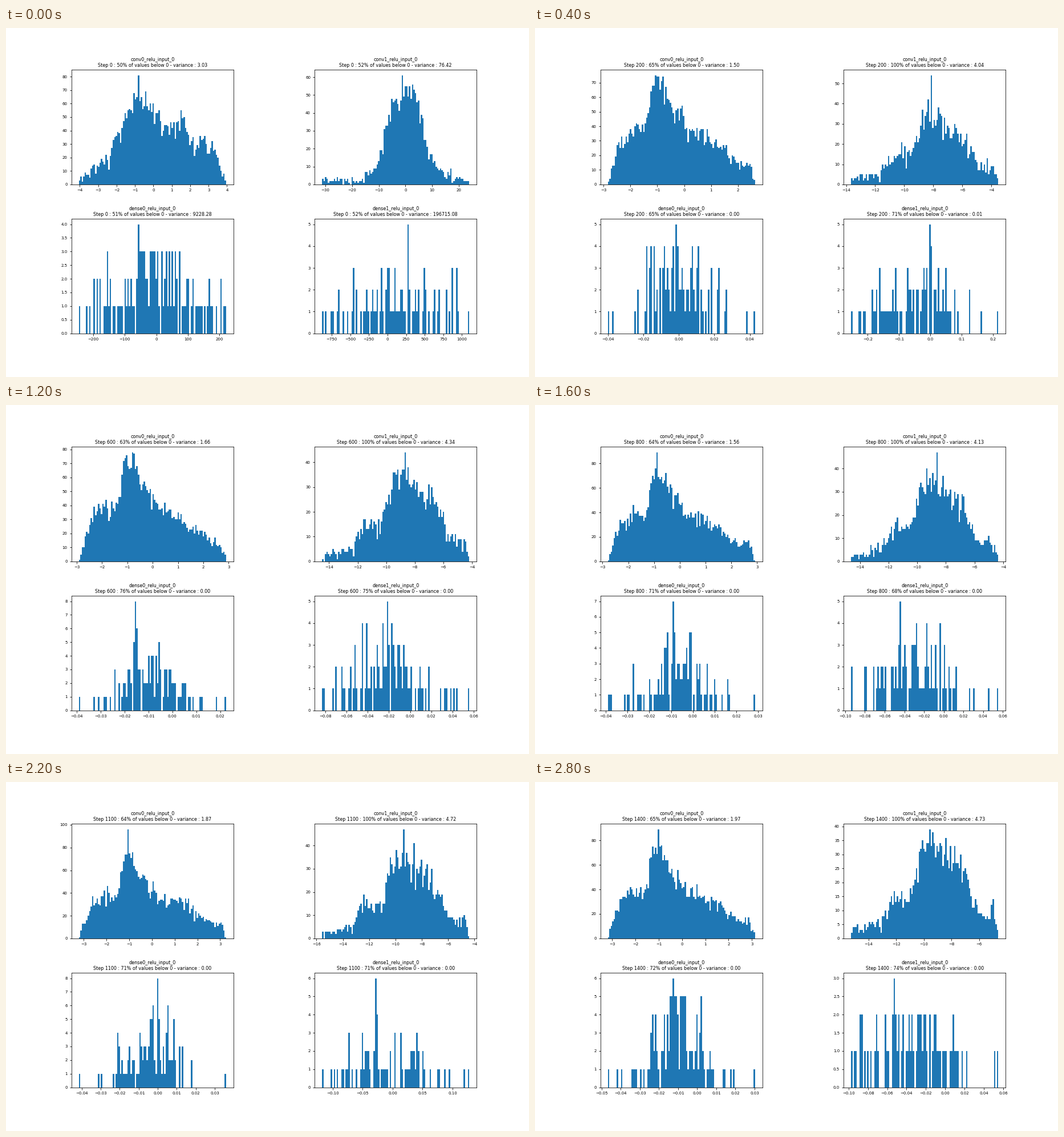
These frames come from a looping animation (917 by 611 pixels, 3 s). A matplotlib script:

```python
import numpy as np
import matplotlib.pyplot as plt
from matplotlib.animation import FuncAnimation

W, H, DPI = 917, 611, 64
PX = 72 / DPI  # points per pixel
BINS = 100
FRAMES, INTERVAL = 15, 200
BLUE = "#1f77b4"

plt.rcParams.update({
    "font.family": "DejaVu Sans",
    "axes.linewidth": 0.8 * PX,
    "axes.titlesize": 8 * PX,
    "axes.titlepad": 5 * PX,
    "xtick.labelsize": 7 * PX,
    "ytick.labelsize": 7 * PX,
})
for side in ("xtick", "ytick"):
    plt.rcParams[side + ".major.size"] = 3.5 * PX
    plt.rcParams[side + ".major.pad"] = 3.5 * PX
    plt.rcParams[side + ".major.width"] = 0.8 * PX

# Training steps at which range, tallest bin and statistics are known
STEPS = [0, 200, 400, 600, 800, 1100, 1400]


def outline(*points):
    """Expected bin heights through a few (bin, height) points."""
    x, y = zip(*points)
    return np.interp(np.arange(BINS), x, y)


def bell(count, mean, sd):
    """Expected bin heights of normally spread samples."""
    p = np.exp(-0.5 * ((np.arange(BINS) - mean) / sd) ** 2)
    return count * p / p.sum()


# "first" is the untrained shape, "later" the one it settles into
PANELS = {
    "conv0": dict(
        lo=[-4.06, -2.84, -2.642, -2.921, -2.796, -3.221, -3.191],
        hi=[3.955, 2.637, 2.715, 2.901, 2.923, 3.263, 3.14],
        top=[81, 75, 110, 78, 89, 96, 89],
        pct=[50, 65, 66, 63, 64, 64, 65],
        var=[3.03, 1.50, 1.60, 1.66, 1.56, 1.87, 1.97],
        first=outline((0, 3), (12, 14), (20, 18), (23, 30), (36, 60), (44, 66),
                      (58, 42), (66, 43), (70, 52), (75, 30), (90, 31),
                      (95, 14), (99, 4)),
        later=outline((0, 1), (8, 30), (16, 37), (25, 38), (31, 75), (36, 73),
                      (41, 56), (48, 48), (53, 36), (68, 32), (88, 15),
                      (96, 13), (99, 3)),
    ),
    "conv1": dict(
        lo=[-31.3, -13.67, -14.09, -14.5, -14.62, -15.59, -15.27],
        hi=[23.95, -3.51, -3.98, -4.18, -4.34, -4.385, -4.62],
        top=[61, 54, 44, 44, 47, 47, 39],
        pct=[52] + [100] * 6,
        var=[76.42, 4.04, 4.21, 4.34, 4.13, 4.72, 4.73],
        first=outline((0, 3), (28, 2), (30, 6), (36, 9), (40, 20), (46, 45),
                      (62, 50), (66, 40), (72, 16), (78, 8), (88, 5), (99, 2)),
        later=outline((0, 2), (20, 5), (28, 15), (40, 15), (48, 32), (52, 36),
                      (60, 32), (68, 27), (78, 22), (86, 9), (96, 8), (99, 3)),
    ),
    "dense0": dict(
        lo=[-246, -0.0401, -0.0353, -0.0392, -0.0391, -0.0416, -0.0468],
        hi=[220.8, 0.0430, 0.0245, 0.0225, 0.0286, 0.0360, 0.0303],
        top=[4, 5, 7, 8, 7, 8, 6],
        pct=[51, 65, 74, 76, 71, 71, 72],
        var=[9228.28] + [0] * 6,
        first=bell(125, 50, 25),
        later=bell(120, 47, 15),
    ),
    "dense1": dict(
        lo=[-881, -0.2538, -0.0925, -0.0831, -0.0942, -0.1181, -0.0975],
        hi=[1099, 0.2172, 0.0813, 0.0558, 0.0555, 0.1281, 0.0549],
        top=[5, 5, 4, 5, 5, 6, 3],
        pct=[52, 71, 70, 75, 68, 71, 74],
        var=[196715.08, 0.01] + [0] * 5,
        first=bell(90, 46, 25),
        later=bell(95, 42, 20),
    ),
}


def heights(name, step, top):
    """Seeded bin counts around the expected shape, tallest bin at top."""
    rng = np.random.default_rng([step, *name.encode()])
    shape = PANELS[name]["later" if step else "first"]
    if name.startswith("conv"):
        h = shape + 0.65 * np.sqrt(shape) * rng.standard_normal(BINS)
    else:
        h = rng.poisson(shape)
    peak = h.argmax()
    h = np.clip(np.rint(h), 0, max(top - 1, 1))
    h[peak] = top
    h[[0, -1]] = np.maximum(h[[0, -1]], 1)
    return h


fig, axes = plt.subplots(2, 2, figsize=(W / DPI, H / DPI), dpi=DPI)
fig.subplots_adjust(left=0.125, right=0.9, bottom=0.125, top=0.88,
                    wspace=0.5, hspace=0.3)


def draw(frame):
    step = frame * 100
    # the values collapse within the first hundred steps, then drift
    at = max(step, STEPS[1]) if step else 0
    for ax, (name, panel) in zip(axes.flat, PANELS.items()):
        lo, hi, top, pct, var = (np.interp(at, STEPS, panel[k])
                                 for k in ("lo", "hi", "top", "pct", "var"))
        edges = np.linspace(lo, hi, BINS + 1)
        ax.clear()
        ax.hist((edges[:-1] + edges[1:]) / 2, bins=edges, color=BLUE,
                weights=heights(name, step, np.rint(top)))
        ax.set_title(f"{name}_relu_input_0\nStep {step} : {pct:.0f}% of values "
                     f"below 0 - variance : {var:.2f}")
    return []


anim = FuncAnimation(fig, draw, frames=FRAMES, interval=INTERVAL,
                     repeat=True, repeat_delay=0)
plt.show()
```
